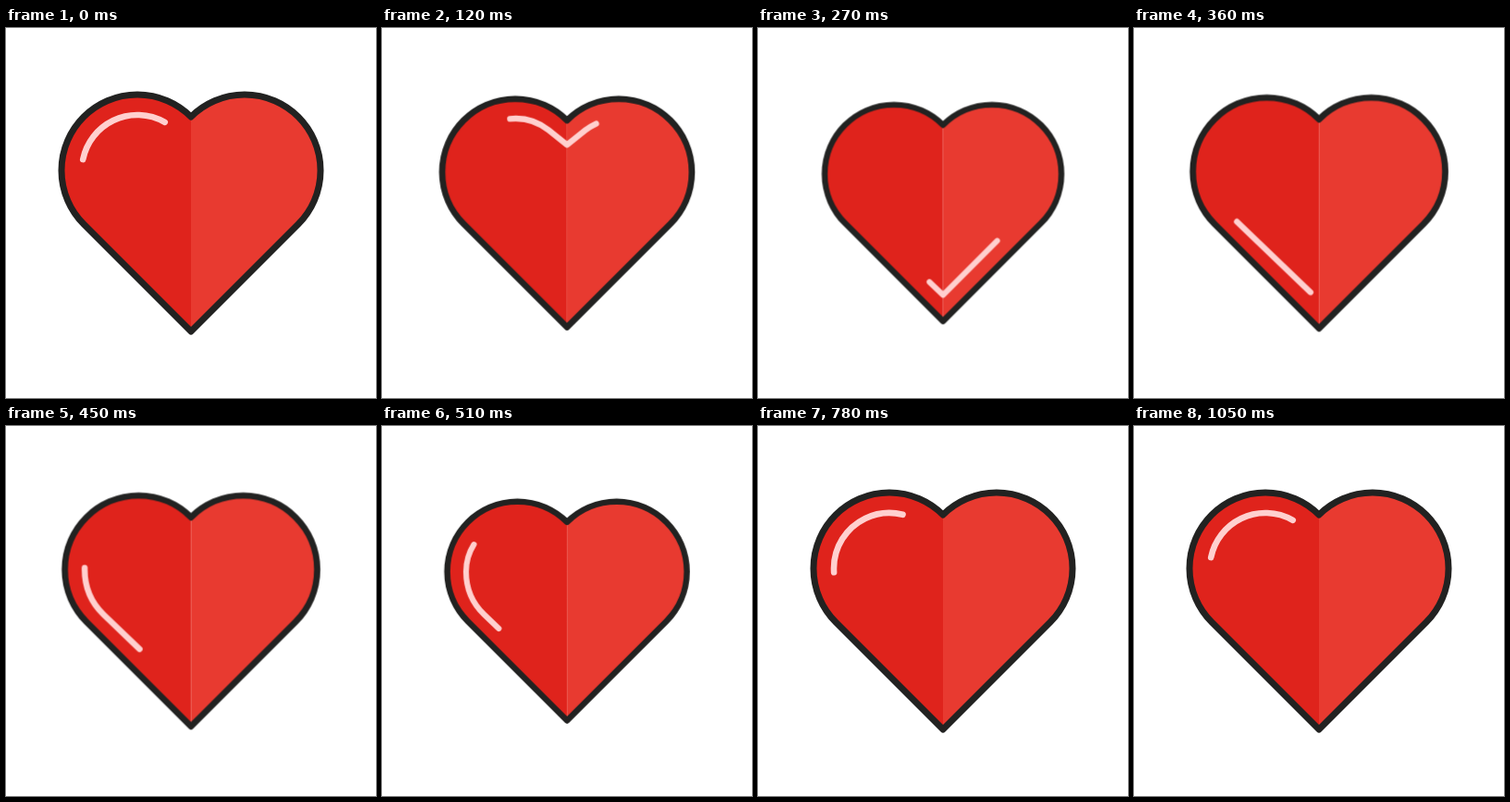
Animation of 400 by 400 pixels, one loop 3260 ms. Source, as an HTML page without scripts:

```html
<!DOCTYPE html>
<html lang="en">
<head>
<meta charset="utf-8">
<title>Beating heart</title>
<style>
  html, body { margin: 0; width: 100%; height: 100%; overflow: hidden; background: #fff; }
  svg { display: block; width: 100%; height: 100%; }

  .heart { transform-origin: 200px 200px; animation: beat 3260ms infinite; }
  .outline { fill: none; stroke: #222221; stroke-width: 7; stroke-linejoin: round; }
  .shine {
    fill: none;
    stroke: #ffd0cf;
    stroke-width: 6.6;
    stroke-linecap: round;
    stroke-linejoin: round;
    stroke-dasharray: 113 587;
    stroke-dashoffset: -12;
    animation: glide 3260ms infinite;
  }

  /* two squeezes, then rest */
  @keyframes beat {
    0%, 1.53% { transform: scale(1); animation-timing-function: cubic-bezier(.333, 0, .667, 1); }
    6.9% { transform: scale(.9); animation-timing-function: cubic-bezier(.333, 0, .667, 1); }
    12.58% { transform: scale(.99); animation-timing-function: cubic-bezier(.333, 0, .667, 1); }
    17.33% { transform: scale(.9); animation-timing-function: cubic-bezier(.333, 0, .667, 1); }
    22.85%, 100% { transform: scale(1); }
  }

  /* one clockwise lap of the shine */
  @keyframes glide {
    0% { stroke-dashoffset: -12; animation-timing-function: cubic-bezier(.28, 0, 0, 1); }
    31.6%, 100% { stroke-dashoffset: -712; }
  }
</style>
</head>
<body>
<svg viewBox="0 0 400 400">
  <g class="heart">
    <path fill="#df231c" d="M200 96A82 82 0 0 0 84 212L200 328Z"/>
    <path fill="#e83a30" d="M200 96A82 82 0 0 1 316 212L200 328Z"/>
    <path class="outline" d="M200 96A82 82 0 0 0 84 212L200 328L316 212A82 82 0 0 0 200 96Z"/>
    <path class="shine" pathLength="700"
      d="M82 154A60 60 0 0 1 179.3 107L200 123.4L220.7 107A60 60 0 0 1 300.4 196.4L200 297L103 204C90 191.5 82 174 82 154Z"/>
  </g>
</svg>
</body>
</html>
```
